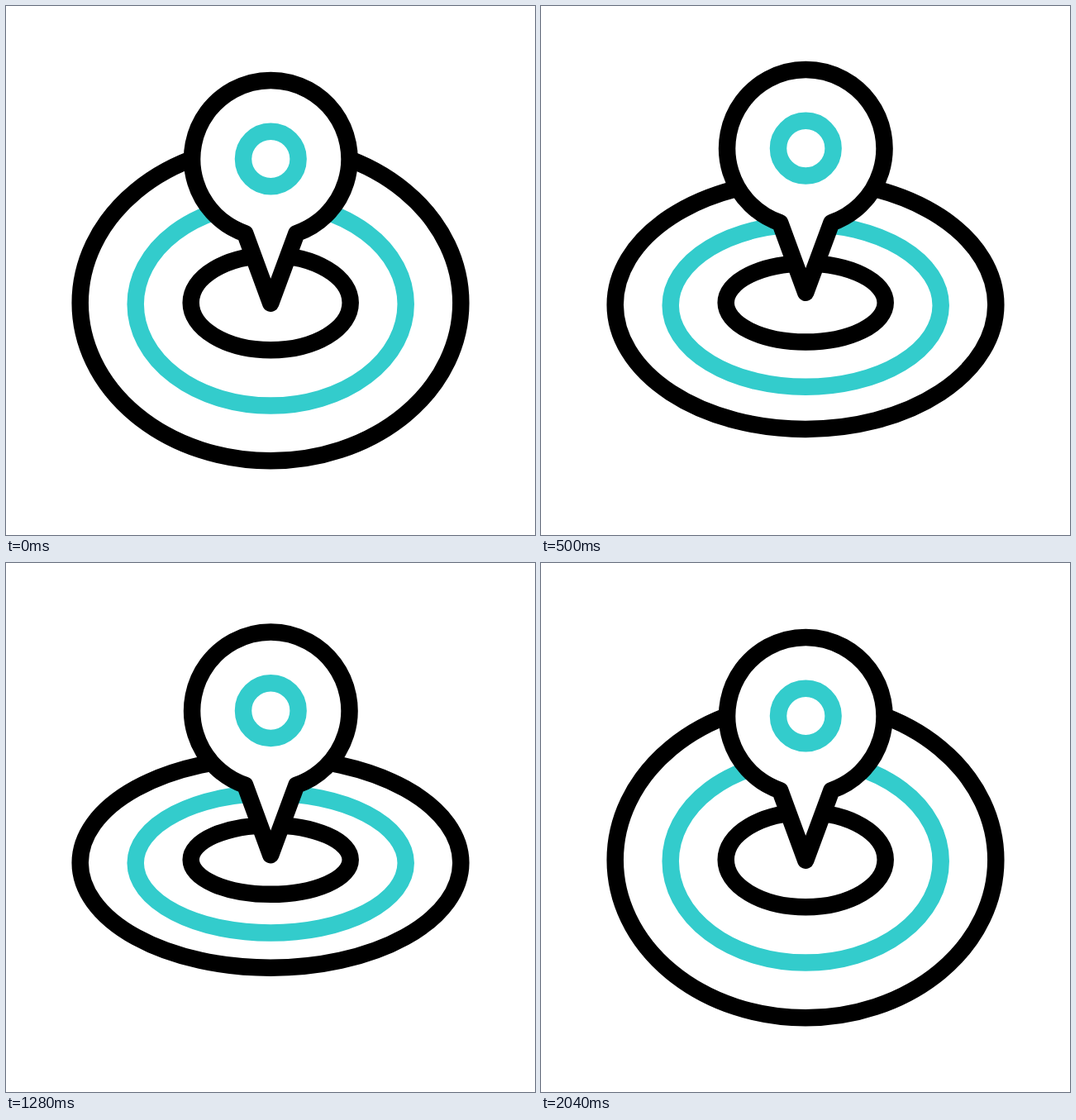
Animation of 640 by 640 pixels, one loop 2400 ms. Source, as an HTML page:

```html
<!DOCTYPE html>
<html lang="en">
<head>
<meta charset="utf-8">
<title>Location pin</title>
<style>
  html, body { margin: 0; width: 100%; height: 100%; overflow: hidden; background: #fff; }
  svg { display: block; width: 100%; height: 100%; }
  .line { fill: none; stroke: #000; stroke-width: 20.5; stroke-linecap: round; stroke-linejoin: round; }
  .teal { stroke: #33cccc; }
  .solid { fill: #fff; }
</style>
</head>
<body>
<svg viewBox="0 0 640 640">
  <ellipse id="outer" class="line" cx="320" rx="230.3"/>
  <ellipse id="middle" class="line teal" cx="320.2" rx="163.5"/>
  <ellipse id="inner" class="line" cx="320.2" rx="96.5"/>
  <g id="pin">
    <path class="line solid" d="M289.2 275.1 A95.2 95.2 0 1 1 351.4 275.1 L320.2 359.6 Z"/>
    <circle class="line teal" cx="320.3" cy="185" r="33.3"/>
  </g>
</svg>
<script>
  const LOOP = 2400;
  const FRAME = 20;

  // Vertical radius and centre of each ring: standing [0] and flattened [1].
  const rings = [
    { id: 'outer', ry: [191.1, 126.4], cy: [359.2, 362.7] },
    { id: 'middle', ry: [122.8, 84.1], cy: [360.8, 363.1] },
    { id: 'inner', ry: [57.2, 41.7], cy: [359, 359] }
  ].map(ring => ({ ...ring, el: document.getElementById(ring.id) }));
  const pin = document.getElementById('pin');

  const mix = ([a, b], k) => a + (b - a) * k;
  const progress = (t, start, end) => Math.min(1, Math.max(0, (t - start) / (end - start)));

  // cubic-bezier(.5, 0, .5, 1), solved for its parameter by bisection
  function ease(x) {
    let low = 0, high = 1;
    for (let i = 0; i < 24; i++) {
      const u = (low + high) / 2;
      if (1.5 * u * (1 - u) + u ** 3 < x) low = u; else high = u;
    }
    return low * low * (3 - 2 * low);
  }

  const hop = (t, start, end, height) => height * Math.sin(Math.PI * progress(t, start, end));

  function draw(t) {
    const flat = ease(progress(t, 20, 870)) - ease(progress(t, 1210, 2040));
    for (const { el, ry, cy } of rings) {
      el.setAttribute('ry', mix(ry, flat));
      el.setAttribute('cy', mix(cy, flat));
    }
    const lift = hop(t, 30, 1110, 13.1) + hop(t, 1110, 1640, 7.5);
    pin.setAttribute('transform', `translate(0 ${-lift})`);
  }

  const start = performance.now();
  function tick() {
    const t = (performance.now() - start) % LOOP;
    draw(Math.floor(t / FRAME) * FRAME);
    requestAnimationFrame(tick);
  }
  draw(0);
  tick();
</script>
</body>
</html>
```
